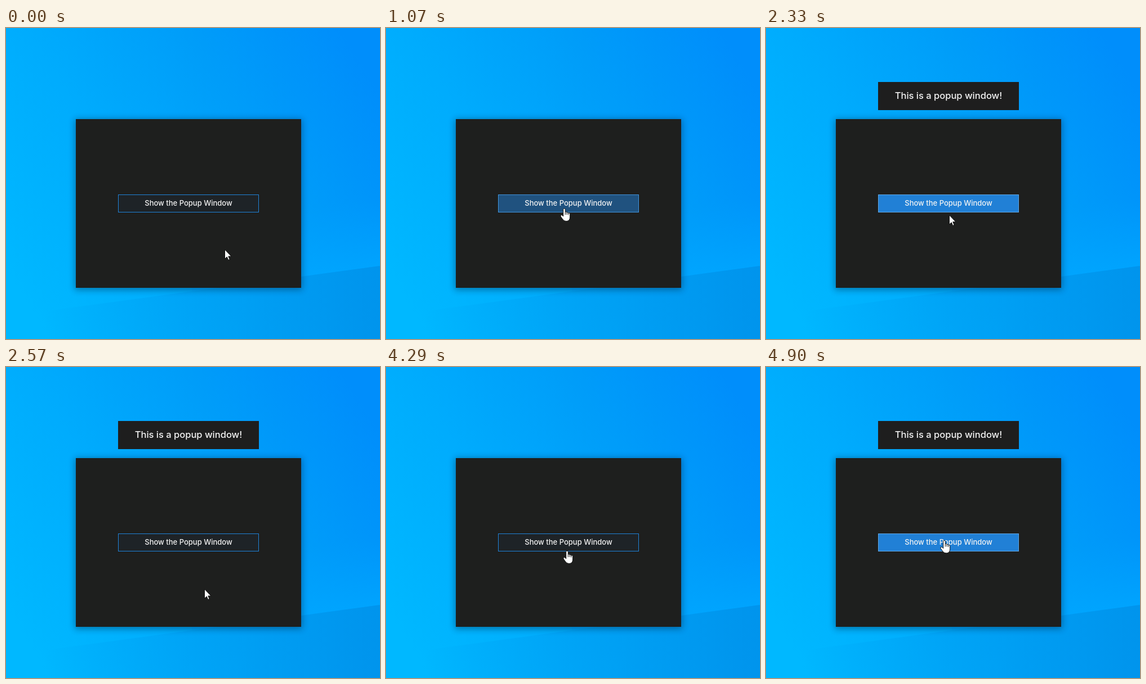
Recreate the animation shown at these times as an HTML page. Size 664 by 553 pixels, loop 6.75 s.

```html
<!DOCTYPE html>
<html lang="en">
<head>
<meta charset="utf-8">
<title>Popup window demo</title>
<style>
  html, body { margin: 0; width: 100%; height: 100%; overflow: hidden; background: #00a2fa; }
  svg { display: block; }
  text { font-family: Inter, "Open Sans", sans-serif; font-weight: 500; fill: #f4f4f4; text-anchor: middle; }
  .cursor { fill: #fff; stroke: #111; stroke-width: 1; stroke-linejoin: round; }
</style>
</head>
<body>
<svg width="664" height="553" viewBox="0 0 664 553">
  <defs>
    <linearGradient id="sky" gradientUnits="userSpaceOnUse" x1="30" y1="480" x2="650" y2="90">
      <stop offset="0" stop-color="#00b8ff"/>
      <stop offset=".35" stop-color="#00acfd"/>
      <stop offset=".68" stop-color="#009df9"/>
      <stop offset="1" stop-color="#008efb"/>
    </linearGradient>
    <linearGradient id="floor">
      <stop offset=".1" stop-color="#009cf0" stop-opacity="0"/>
      <stop offset=".6" stop-color="#009cf0" stop-opacity=".65"/>
      <stop offset="1" stop-color="#0094ec" stop-opacity=".95"/>
    </linearGradient>
    <linearGradient id="beam" gradientUnits="userSpaceOnUse" x1="594" y1="432" x2="578" y2="312">
      <stop offset="0" stop-color="#00a6ff" stop-opacity=".8"/>
      <stop offset="1" stop-color="#00a0ff" stop-opacity="0"/>
    </linearGradient>
    <filter id="blur" x="-10%" y="-10%" width="120%" height="120%">
      <feGaussianBlur stdDeviation="6"/>
    </filter>
  </defs>

  <rect width="664" height="553" fill="url(#sky)"/>
  <path d="M330 468L664 423V303L330 348Z" fill="url(#beam)"/>
  <path d="M0 513L664 423V553H0Z" fill="url(#floor)"/>

  <rect x="122" y="162" width="404" height="304" fill="#002040" opacity=".42" filter="url(#blur)"/>
  <rect x="124" y="162" width="400" height="300" fill="#1e1f1e"/>

  <rect id="button" x="199.5" y="296.5" width="249" height="31"/>
  <text x="324" y="316" font-size="13">Show the Popup Window</text>

  <g id="popup">
    <rect x="199" y="96" width="250" height="50" fill="#1e1e1e"/>
    <text x="324" y="126" font-size="16.5">This is a popup window!</text>
  </g>

  <path id="arrow" class="cursor" d="M.5 0V16.5L4.3 13L6.7 18.6L9.2 17.5L6.8 12H12Z"/>
  <g id="hand" class="cursor">
    <path d="M-1.8 1.6Q-1.6 0 0 0T1.8 1.6V6Q4.2 5.2 4.6 7Q7 6.2 7.4 8Q10 7.4 10.2 9.6V15Q10 22.5 3.5 22.5Q-1 22.5 -3 18.8L-6.5 14Q-7 11.6 -5 11.4Q-3.5 11.5 -1.8 14Z"/>
    <path d="M1.8 6V11M4.6 7V11M7.4 8V11.5" fill="none"/>
  </g>
</svg>
<script>
const LOOP = 6750, STEP = 30, FADE = 180;
const [button, popup, arrow, hand] =
  ["button", "popup", "arrow", "hand"].map(id => document.getElementById(id));

const smooth = p => p * p * (3 - 2 * p);
const easeOut = p => 1 - (1 - p) ** 2;
const clamp = v => Math.max(0, Math.min(1, v));
const lerp = (a, b, p) => a + (b - a) * p;
const mix = (a, b, p) => `rgb(${a.map((v, i) => Math.round(lerp(v, b[i], p)))})`;
const within = (t, from, to) => t >= from && t < to;

// Pointer moves: start, end, from, to, easing
const moves = [
  [500, 1070, [388, 394], [316.5, 321], smooth],
  [1070, 1190, [316.5, 321], [315.5, 311], easeOut],
  [2210, 2570, [315.5, 311], [352, 395], smooth],
  [3660, 4290, [352, 395], [321.5, 327], smooth],
  [4290, 4470, [321.5, 327], [316.5, 308.5], easeOut]
];

function pointerAt(t) {
  let position = moves[0][2];
  for (const [start, end, from, to, ease] of moves) {
    if (t < start) break;
    const steppedTime = start + Math.floor((t - start) / STEP) * STEP;
    const p = ease(clamp((steppedTime - start) / (end - start)));
    position = from.map((v, i) => lerp(v, to[i], p));
  }
  return position;
}

function hoverAt(t) {
  const fade = start => clamp((Math.floor((t - start) / STEP) * STEP) / FADE);
  return fade(980) - fade(2330) + fade(4290);
}

function draw(t) {
  const [x, y] = pointerAt(t);
  const overButton = y <= 328;
  const hover = hoverAt(t);

  button.setAttribute("fill", mix([30, 35, 39], [33, 128, 214], hover));
  button.setAttribute("stroke", mix([31, 130, 216], [98, 166, 224], hover));
  popup.style.display = within(t, 1550, 2830) || t >= 4730 ? "" : "none";
  arrow.style.display = overButton ? "none" : "";
  hand.style.display = overButton ? "" : "none";
  (overButton ? hand : arrow).setAttribute("transform", `translate(${x} ${y})`);
}

let begin;
function frame(now) {
  begin ??= now;
  draw((now - begin) % LOOP);
  requestAnimationFrame(frame);
}
draw(0);
requestAnimationFrame(frame);
</script>
</body>
</html>
```
